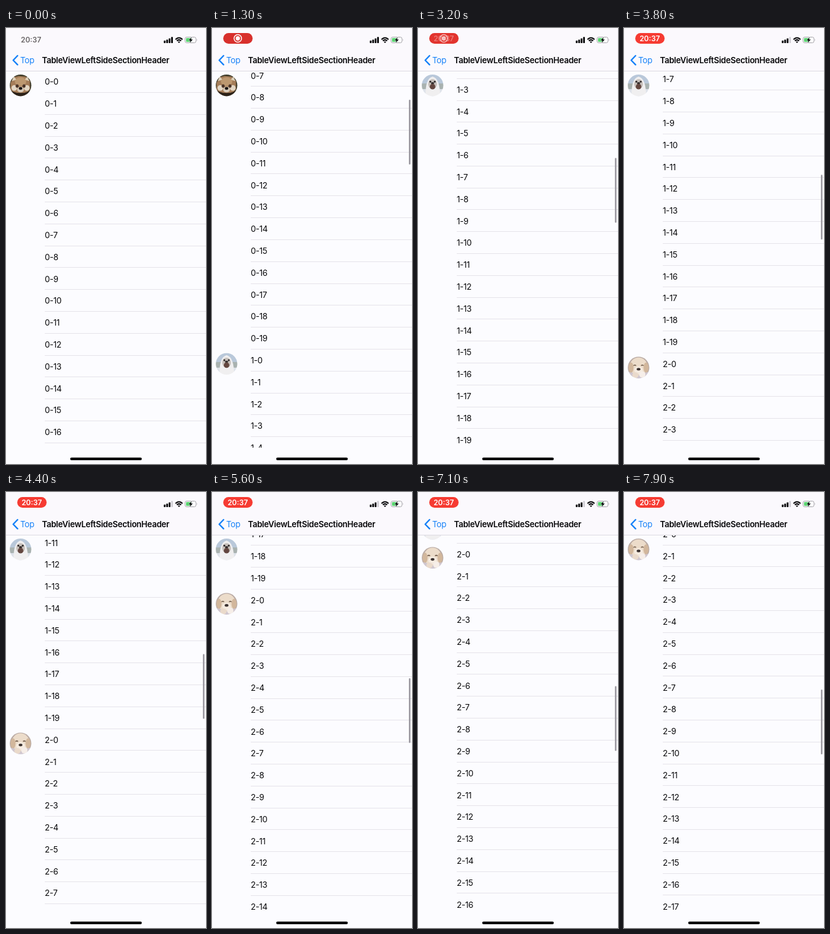
An HTML page for the animation above (8000 ms loop, 320 px wide and 693 px high).

```html
<!DOCTYPE html>
<html lang="en">
<head>
<meta charset="utf-8">
<title>Table view with side section headers</title>
<style>
  html, body { margin: 0; width: 100%; height: 100%; overflow: hidden; background: #fcfcff; }
  svg { display: block; width: 100%; height: 100%; }
  text { font: 400 13.14px Inter, Roboto, sans-serif; letter-spacing: -.3px; fill: #060608; }
  .title { font-weight: 600; letter-spacing: -.28px; }
  .time { font-size: 11.6px; font-weight: 600; letter-spacing: 0; text-anchor: middle; }
</style>
</head>
<body>
<svg viewBox="0 0 320 693">
  <defs>
    <clipPath id="list"><rect y="69" width="320" height="598"/></clipPath>
    <clipPath id="disc"><circle r="17.2"/></clipPath>
    <filter id="soft" x="-20%" y="-20%" width="140%" height="140%"><feGaussianBlur stdDeviation=".7"/></filter>
  </defs>
  <rect width="320" height="693" fill="#fcfcff"/>

  <g clip-path="url(#list)">
    <g id="rows"></g>
    <g class="avatar"><g clip-path="url(#disc)"><g filter="url(#soft)">
      <circle r="20" fill="#3c3a28"/>
      <path d="M-16-4-11-13-3-15 8-14 15-7 15 6 8 14-9 14-16 6Z" fill="#a47c58"/>
      <path d="M-14-7-11-14-6-9ZM14-7 11-14 6-9Z" fill="#dccfb8"/>
      <ellipse cy="-6" rx="9" ry="7" fill="#bc9870"/>
      <ellipse cx="-10" cy="4" rx="4.5" ry="4.5" fill="#e2d6c4"/>
      <ellipse cx="10" cy="4" rx="4.5" ry="4.5" fill="#e2d6c4"/>
      <ellipse cx="-5.5" cy="1" rx="2.4" ry="2.6" fill="#4a3428"/>
      <ellipse cx="5.5" cy="1" rx="2.4" ry="2.6" fill="#4a3428"/>
      <ellipse cy="6.5" rx="5.5" ry="4.5" fill="#d8ccbc"/>
      <ellipse cy="4.8" rx="2.8" ry="2.2" fill="#1c1614"/>
      <path d="M-15 9Q0 15 15 9L8 20H-8Z" fill="#2c2218"/>
    </g></g></g>
    <g class="avatar"><g clip-path="url(#disc)"><g filter="url(#soft)">
      <rect x="-20" y="-20" width="40" height="40" fill="#b9c8da"/>
      <rect x="-20" y="-3" width="40" height="9" fill="#a9b2b0"/>
      <rect x="-20" y="6" width="40" height="14" fill="#dfe3ea"/>
      <path d="M-11 17Q-12-11 0-14 12-11 12 17Z" fill="#f0eff0"/>
      <ellipse cy="-2" rx="7" ry="8" fill="#c6bfba"/>
      <circle cx="-3.5" cy="-6" r="1.5" fill="#2c2828"/>
      <circle cx="3.5" cy="-6" r="1.5" fill="#2c2828"/>
      <ellipse cy="-3.5" rx="2.5" ry="1.6" fill="#302a2a"/>
      <ellipse cy="2" rx="4.4" ry="4.4" fill="#63463f"/>
    </g></g></g>
    <g class="avatar"><g clip-path="url(#disc)"><g filter="url(#soft)">
      <rect x="-20" y="-20" width="40" height="40" fill="#b9aaa4"/>
      <rect x="-20" y="7" width="40" height="13" fill="#cfc6cf"/>
      <ellipse cy="-2" rx="14" ry="14" fill="#ecdcca"/>
      <ellipse cx="-12" cy="0" rx="4" ry="8" fill="#d2b79c"/>
      <ellipse cx="12" cy="0" rx="4" ry="8" fill="#d2b79c"/>
      <ellipse cy="4" rx="7" ry="6" fill="#f5ebe0"/>
      <path d="M-8-3Q-6-5-4-3M4-3Q6-5 8-3" fill="none" stroke="#75604f" stroke-width="1.5"/>
      <ellipse cy="2.5" rx="3" ry="2.1" fill="#3c3230"/>
      <ellipse cx="-5" cy="12" rx="5" ry="4.5" fill="#eadacb"/>
      <ellipse cx="6" cy="11" rx="5" ry="5" fill="#f6eee8"/>
    </g></g></g>
  </g>
  <rect id="bar" x="315" width="2.6" height="103" rx="1.3" fill="#9d9ba2"/>

  <rect width="320" height="68" fill="#fbf9fd"/>
  <rect y="68" width="320" height="1" fill="#dedbe2"/>
  <path d="M18.5 44 11.5 51.2 18.5 58.4" fill="none" stroke="#1380f8" stroke-width="2.3" stroke-linecap="round" stroke-linejoin="round"/>
  <text x="22.7" y="55.8" style="fill:#1380f8">Top</text>
  <text class="title" x="57.5" y="55.8">TableViewLeftSideSectionHeader</text>

  <text id="clock" class="time" x="40" y="23.3" style="fill:#6a6668">20:37</text>
  <g id="pill">
    <rect id="pillBack" x="18" y="8" width="47" height="17" rx="8.5"/>
    <g id="record">
      <circle cx="41.3" cy="16.5" r="6" fill="none" stroke="#fff" stroke-width="1.5"/>
      <circle cx="41.3" cy="16.5" r="3.4" fill="#fff"/>
    </g>
    <text id="pillTime" class="time" x="41.2" y="20.8" style="fill:#fff">20:37</text>
  </g>

  <g fill="#060608">
    <rect x="252.5" y="20" width="2.8" height="4" rx=".7"/>
    <rect x="256.4" y="18.4" width="2.8" height="5.6" rx=".7"/>
    <rect x="260.3" y="16.4" width="2.8" height="7.6" rx=".7"/>
    <rect id="lastSignal" x="264.2" y="14.2" width="2.8" height="9.8" rx=".7"/>
  </g>
  <g fill="none" stroke="#060608" stroke-width="2">
    <path d="M271.2 18.2Q276.8 12.6 282.4 18.2M273.4 20.5Q276.8 17.2 280.2 20.5"/>
    <path d="M274.9 22 276.8 24.1 278.7 22Q276.8 20.6 274.9 22Z" fill="#060608" stroke="none"/>
  </g>
  <rect x="286.5" y="14.5" width="17.5" height="9" rx="2.6" fill="#fcfcff" stroke="#a8a6aa"/>
  <rect x="288" y="16" width="8.5" height="6" rx="1.3" fill="#5cd672"/>
  <path d="M305.3 17.4Q306.8 19 305.3 20.6Z" fill="#a8a6aa"/>
  <path d="M297.2 14.4 292.2 19.8H295L293.8 23.8 298.8 18.2H295.9Z" fill="#060608" stroke="#fcfcff" stroke-width=".8" paint-order="stroke"/>
  <rect x="102.7" y="682.7" width="114.6" height="4.3" rx="2.1" fill="#040406"/>
</svg>
<script>
const LOOP = 8000, STEP = 100, ROW = 34.8, TOP = 68.2, PER_SECTION = 20;
const $ = id => document.getElementById(id);
const avatars = [...document.querySelectorAll('.avatar')];

// Scroll positions over time: [ms, px]
const knots = [[0, 0], [300, 0], [1300, 253.3], [3200, 787.9], [4400, 1083.6],
               [5600, 1305.5], [6400, 1346], [7900, 1410.4], [8000, 1413]];

const secants = knots.slice(1).map(([t, y], i) => (y - knots[i][1]) / (t - knots[i][0]));
// Harmonic mean keeps the curve monotone
const slopes = knots.map((_, i) => {
  const a = secants[i - 1] ?? 0, b = secants[i] ?? a;
  return a * b > 0 ? 2 * a * b / (a + b) : 0;
});

function scrollAt(t) {
  let i = 0;
  while (i < knots.length - 2 && t >= knots[i + 1][0]) i++;
  const [t0, y0] = knots[i], [t1, y1] = knots[i + 1];
  const h = t1 - t0, u = (t - t0) / h, v = 1 - u;
  return y0 * (1 + 2 * u) * v * v + slopes[i] * h * u * v * v
       + y1 * u * u * (3 - 2 * u) - slopes[i + 1] * h * u * u * v;
}

const ramp = (t, from, to) => Math.min(1, Math.max(0, (t - from) / (to - from)));

const svgNode = (name, attrs) => {
  const node = document.createElementNS('http://www.w3.org/2000/svg', name);
  for (const key in attrs) node.setAttribute(key, attrs[key]);
  return $('rows').appendChild(node);
};

const rows = Array.from({ length: 3 * PER_SECTION }, (_, i) => {
  const label = svgNode('text', { x: 62 });
  label.textContent = `${Math.floor(i / PER_SECTION)}-${i % PER_SECTION}`;
  const line = svgNode('rect', { x: 62, width: 258, height: 1, fill: '#e6e4ea' });
  return { label, line };
});

function render(t) {
  const scroll = scrollAt(t);
  rows.forEach(({ label, line }, i) => {
    const top = TOP + i * ROW - scroll;
    label.setAttribute('y', top + 22.1);
    line.setAttribute('y', Math.round(top + ROW - 1));
  });

  const height = PER_SECTION * ROW;
  avatars.forEach((avatar, i) => {
    const top = TOP + i * height - scroll;
    const y = Math.min(Math.max(top, TOP) + 23, top + height - 23);
    avatar.setAttribute('transform', `translate(23.3 ${y})`);
  });

  $('bar').setAttribute('y', 70.2 + scroll * .1729);
  $('bar').setAttribute('opacity', ramp(t, 200, 500));

  const shown = ramp(t, 200, 600), swap = ramp(t, 3000, 3600);
  $('clock').setAttribute('opacity', 1 - shown);
  $('pill').setAttribute('opacity', shown);
  $('record').setAttribute('opacity', 1 - swap);
  $('pillTime').setAttribute('opacity', swap);
  $('pillBack').setAttribute('fill', `rgb(${216 + 30 * swap} ${48 + 11 * swap} ${44 + 6 * swap})`);
  $('lastSignal').setAttribute('fill', t < 3800 ? '#060608' : '#d0ced4');
}

function tick() {
  const t = performance.now() % LOOP;
  render(Math.floor(t / STEP) * STEP);
  requestAnimationFrame(tick);
}
tick();
</script>
</body>
</html>
```
